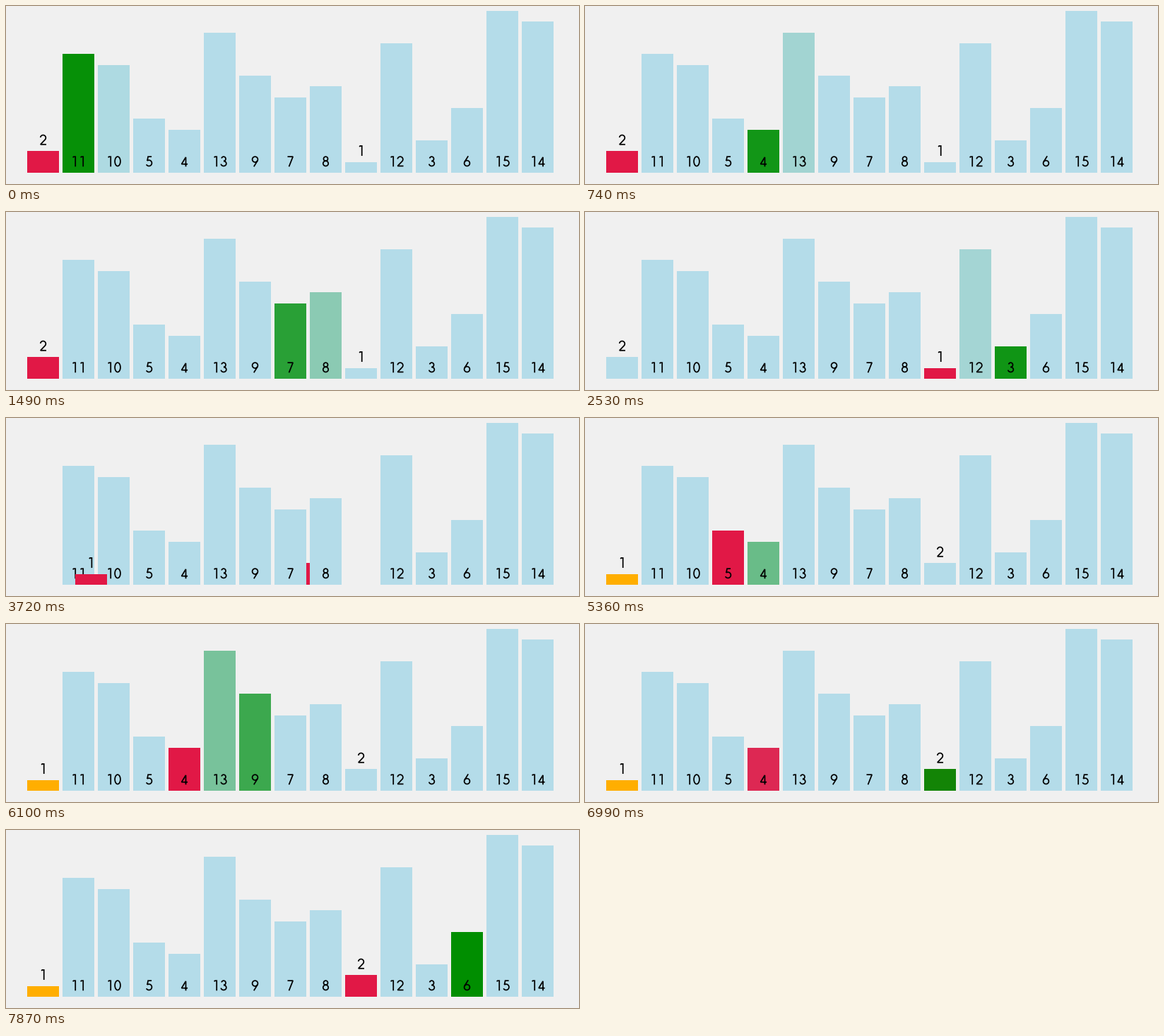
A matplotlib script that plays this animation: 811x253 px, repeating every 8 s.

```python
import numpy as np
import matplotlib.pyplot as plt
from matplotlib.animation import FuncAnimation
from matplotlib.colors import to_rgb
from matplotlib.patches import Rectangle

W, H, DPI = 811, 253, 64
LOOP_MS, FRAMES = 8000, 54
VALUES = [2, 11, 10, 5, 4, 13, 9, 7, 8, 1, 12, 3, 6, 15, 14]
LEFT, PITCH, BAR_W, FLOOR, UNIT = 30, 50, 45, 237, 230 / 15
LABEL_GAP, DIGIT_W, STROKE = 8.7, 11, 1.75

IDLE, LOWEST, COMPARED, SORTED = map(
    to_rgb, ("#b4dce9", "#e11846", "#008e00", "#ffae00"))

# Sort steps completed at time zero and per drawn frame
START_STEP, STEP_RATE = 1.2, 0.6186


def selection_sort(values):
    """Return the (slots, colours) of each value after every sort step."""
    order, done, states = list(values), set(), []

    def record(lowest=(), compared=None):
        slots, colours = {}, {}
        for slot, v in enumerate(order):
            slots[v] = slot
            if slot in lowest:
                colours[v] = LOWEST
            elif slot == compared:
                colours[v] = COMPARED
            else:
                colours[v] = SORTED if slot in done else IDLE
        states.append((slots, colours))

    for i in range(len(order) - 1):
        low = i
        record({low})
        for j in range(i + 1, len(order)):
            record({low}, j)
            if order[j] < order[low]:
                low = j
                record({low})
        record({i, low})
        order[i], order[low] = order[low], order[i]
        record({i, low})
        done.add(i)
        record()
    return states


def arc(cx, cy, rx, ry, start=0, end=360):
    a = np.radians(np.linspace(start, end, 40))
    return np.column_stack([cx + rx * np.cos(a), cy + ry * np.sin(a)])


def line(*points):
    return np.array(points, float)


# Geometric digits, 15 units tall, centred on x = 0, baseline at y = 0
SIX = [line((1.7, 15), (-3.3, 6.9)), arc(0, 4.75, 3.9, 3.9)]
DIGITS = {
    "0": [arc(0, 7.5, 3.9, 6.7)],
    "1": [line((-2.4, 13), (-1.2, 14.1), (1.2, 14.1), (1.2, 0))],
    "2": [np.vstack([arc(0, 10.3, 3.8, 3.85, 172, -40),
                     line((-3.7, 0.85), (4.5, 0.85))])],
    "3": [arc(0, 11, 3, 3.15, 165, -90), arc(0, 4.35, 3.8, 3.5, 90, -170)],
    "4": [line((2, 0), (2, 13.4), (-4, 3.6), (4.6, 3.6))],
    "5": [np.vstack([line((3.6, 14.15), (-1.4, 14.15)),
                     arc(-0.2, 5, 4.1, 4.15, 125, -152)])],
    "6": SIX,
    "7": [line((-4, 14.15), (3.6, 14.15), (-2, 0))],
    "8": [arc(0, 11.1, 3, 3.05), arc(0, 4.45, 3.7, 3.6)],
    "9": [line((0, 15)) - stroke for stroke in SIX],
}


def number_strokes(n):
    """Join the strokes of a number, centred on x = 0, with NaN breaks."""
    text, parts = str(n), []
    for k, ch in enumerate(text):
        shift = (k - (len(text) - 1) / 2) * DIGIT_W
        for stroke in DIGITS[ch]:
            parts += [stroke + (shift, 0), line((np.nan, np.nan))]
    return np.vstack(parts).T


def ease(t):
    return 4 * t ** 3 if t < 0.5 else 1 - 4 * (1 - t) ** 3


def mix(a, b, t):
    return a + (b - a) * t


fig = plt.figure(figsize=(W / DPI, H / DPI), dpi=DPI, facecolor="#f0f0f0")
ax = fig.add_axes([0, 0, 1, 1])
ax.set(xlim=(0, W), ylim=(H, 0))
ax.axis("off")

STATES = selection_sort(VALUES)
bars = {}
for z, v in enumerate(VALUES):
    height = v * UNIT
    bar = Rectangle((0, FLOOR - height), BAR_W, height, lw=0, zorder=2 * z)
    ax.add_patch(bar)
    base = FLOOR - LABEL_GAP - (height if v < 3 else 0)
    dx, dy = number_strokes(v)
    label, = ax.plot(dx, base - dy, color="black", lw=STROKE * 72 / DPI,
                     solid_capstyle="butt", solid_joinstyle="miter",
                     zorder=2 * z + 1)
    bars[v] = bar, label, dx + BAR_W / 2


def draw(frame):
    step, t = divmod(START_STEP + STEP_RATE * frame, 1)
    t = ease(t)
    slots_a, colours_a = STATES[int(step)]
    slots_b, colours_b = STATES[int(step) + 1]
    artists = []
    for v, (bar, label, dx) in bars.items():
        x = LEFT + PITCH * mix(slots_a[v], slots_b[v], t)
        bar.set_x(x)
        bar.set_facecolor(mix(np.array(colours_a[v]),
                              np.array(colours_b[v]), t))
        label.set_xdata(x + dx)
        artists += [bar, label]
    return artists


anim = FuncAnimation(fig, draw, frames=FRAMES, interval=LOOP_MS / FRAMES,
                     init_func=lambda: draw(0), repeat=True, repeat_delay=0)
plt.show()
```
